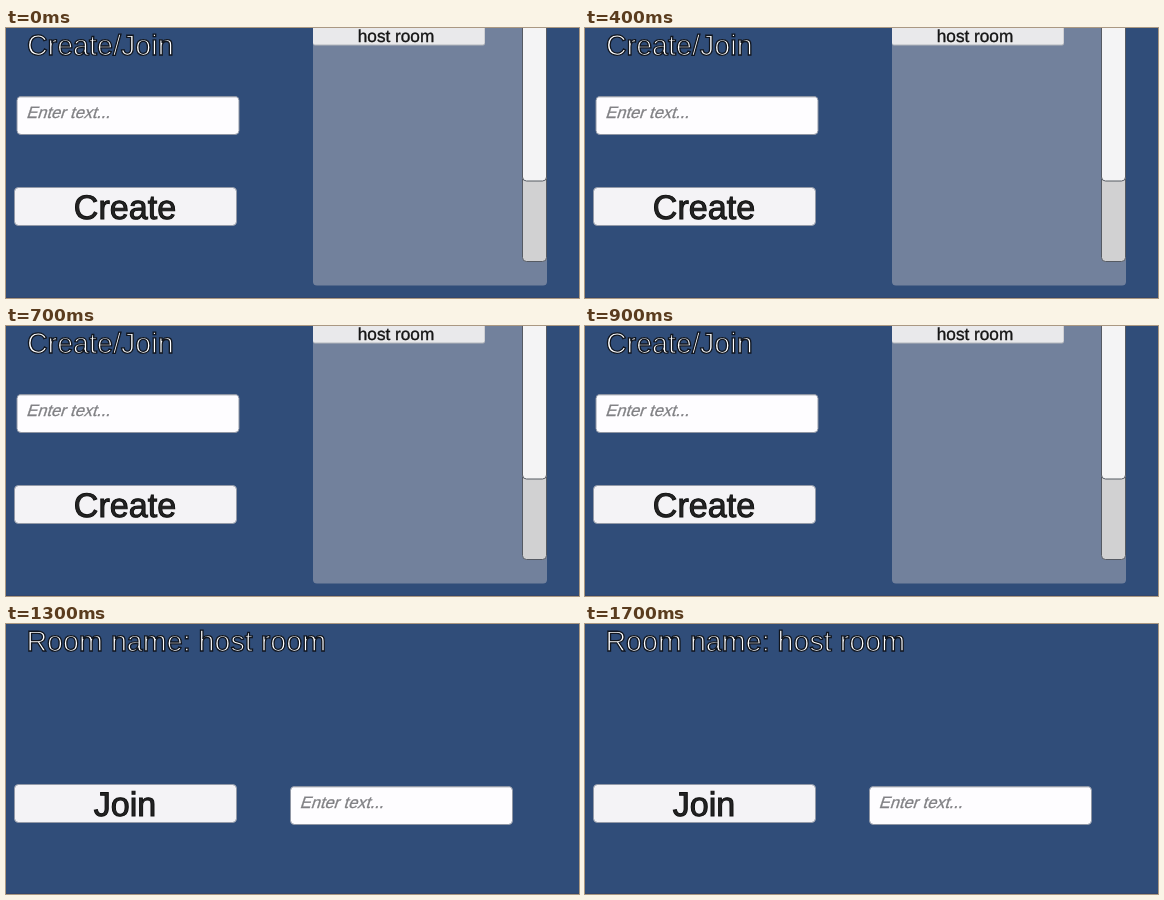
Recreate the animation shown at these times as an HTML page. Size 573 by 270 pixels, loop 2100 ms.

```html
<!DOCTYPE html>
<html lang="en">
<head>
<meta charset="utf-8">
<title>Room lobby</title>
<style>
  html, body { margin: 0; width: 100%; height: 100%; overflow: hidden; background: #304d79; }
  svg { display: block; width: 100%; height: 100%; }
  text { font-family: "Liberation Sans", Arial, sans-serif; white-space: pre; text-rendering: geometricPrecision; }
  .title { font-size: 28.7px; fill: #fff; stroke: #10151e; stroke-width: 1.3px; }
  .label { font-size: 34.1px; fill: #242424; stroke: #101010; stroke-width: 1px; text-anchor: middle; }
  .row { font-size: 17.2px; fill: #161616; stroke: #161616; stroke-width: .35px; text-anchor: middle; }
  .hint { font-size: 16.4px; fill: #808084; stroke: #808084; stroke-width: .3px; }
</style>
</head>
<body>
<svg id="stage" viewBox="0 0 573 270"></svg>
<script>
const LOOP = 2100;
const JOIN_AT = 1000;
const stage = document.getElementById("stage");

const box = (x, y, w, h, fill, stroke = "none", r = 4) =>
  `<rect x="${x}" y="${y}" width="${w}" height="${h}" rx="${r}" fill="${fill}" stroke="${stroke}"/>`;

const text = (cls, x, y, str, slant = 0) =>
  `<text class="${cls}" transform="translate(${x} ${y}) skewX(${-slant})">${str}</text>`;

const button = (y, str) =>
  box(8.5, y + .5, 222, 38, "#f4f3f6", "#939aa8") + text("label", 119, y + 32.2, str);

const input = (x, y) =>
  box(x + .5, y + .5, 222, 38, "#fefdff", "#8f96a4") +
  box(x + 3, y + 1, 217, 1, "#dcdde2", "none", 0) +
  text("hint", x + 9.6, y + 22.4, "Enter text...", 18);

const roomList =
  box(307, -8, 234, 265.5, "#72819c") +
  box(307, -8, 172, 25.5, "#b4b7bd", "none", 2) +
  box(307, -8, 171.5, 24.5, "#e9e9eb", "none", 2) +
  text("row", 390, 13.6, "host room") +
  box(516.5, -8.5, 24, 242, "#d1d1d2", "#555a63") +
  box(516.5, -8.5, 24, 161.5, "#f4f4f5", "#555a63");

const screens = {
  lobby: text("title", 20.9, 27.2, "Create/Join") + input(10.5, 68) + button(159, "Create") + roomList,
  join: text("title", 20.4, 27.2, "Room name: host room") + button(160, "Join") + input(284, 162)
};

const floor = box(0, 269, 573, 1, "#32466d", "none", 0);
stage.innerHTML = box(0, 0, 573, 270, "#304d79", "none", 0) + floor +
  Object.entries(screens).map(([id, body]) => `<g id="${id}">${body}</g>`).join("");

const lobby = document.getElementById("lobby");
const join = document.getElementById("join");

function draw(t) {
  const joining = t >= JOIN_AT;
  lobby.setAttribute("display", joining ? "none" : "inline");
  join.setAttribute("display", joining ? "inline" : "none");
}

const start = performance.now();
function tick() {
  draw((performance.now() - start) % LOOP);
  requestAnimationFrame(tick);
}
tick();
</script>
</body>
</html>
```
